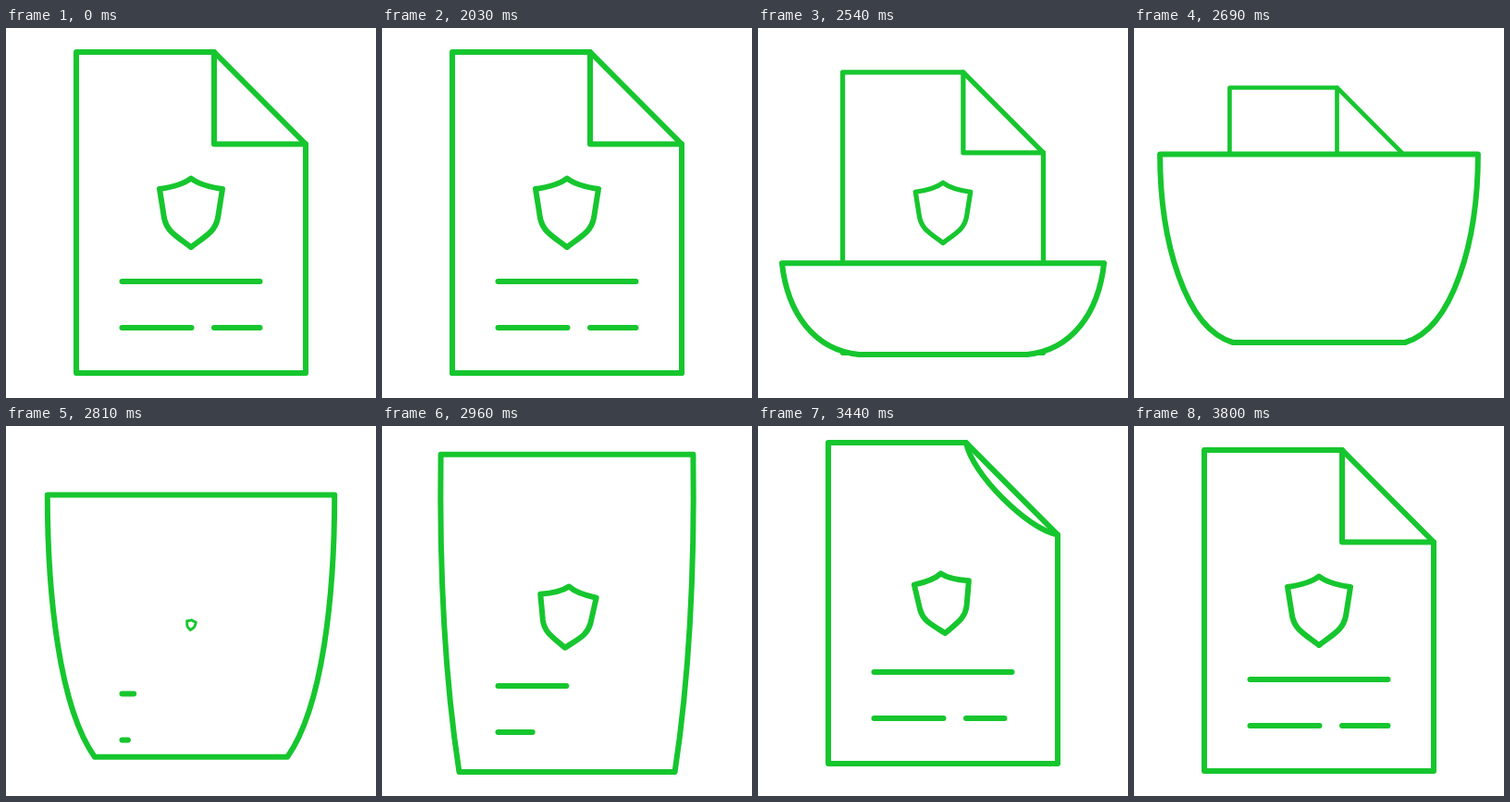
Recreate the animation shown at these times as an HTML page with a canvas. Size 400 by 400 pixels, loop 3830 ms.

```html
<!DOCTYPE html>
<html lang="en">
<head>
<meta charset="utf-8">
<title>Secured document</title>
<style>
  html, body { margin: 0; width: 100%; height: 100%; overflow: hidden; background: #fff; }
  canvas { display: block; width: 400px; height: 400px; }
</style>
</head>
<body>
<canvas id="stage" width="400" height="400"></canvas>
<script>
const ctx = document.getElementById('stage').getContext('2d');
const LOOP = 3830, FLIP = 2030, FLAT = 3200, CUT = 99.5;
const SHIELD = new Path2D('M0-37Q-10-29-34-25.5L-29 6C-26 20-18 24 0 37.5C18 24 26 20 29 6L34-25.5Q10-29 0-37Z');

// Turning sheet: time, edge y, edge half-width, fold y, fold half-width,
// then half-width and height fraction of both side handles
const SHEET = [
  [2030, 373, 124, 373, 124, 124, .4, 124, .8],
  [2150, 381, 133, 372, 119, 131, .5, 124, .9],
  [2270, 375, 147, 371, 106, 138, .65, 124, 1],
  [2390, 345, 159, 368, 95, 145, .74, 125, 1],
  [2540, 255, 174, 353, 91, 168, .55, 139, .95],
  [2600, 205, 177, 346, 91, 173, .5, 143, .94],
  [2690, 137, 172, 340, 93, 172, .46, 145, .926],
  [2820, 71, 154, 359, 105, 154, .38, 142, .8],
  [2960, 31, 136.5, 374, 116.5, 138, .32, 134, .67],
  [3080, 19, 129, 370, 122, 130, .33, 128, .67],
  [FLAT, 12, 124, 359, 124, 124, .33, 124, .67]
];
const RISE = [[FLAT, -14], [3260, -15], [3440, -8], [3620, -2], [3800, 0]];
const INK_Y = [[2780, 16], [2960, 7], [3080, -5], [FLAT, -14]];
const CORNER = [[FLAT, -1], [3440, .2], [3620, 1]];
const BADGE = [[2760, 0, 9], [2960, .89, 3.7], [3200, .88, 0], [3440, .87, -4.2], [3740, 1, 0]];

// Smooth interpolation through rows of [time, ...values]
function track(rows, t) {
  const last = rows.length - 1;
  if (t <= rows[0][0]) return rows[0].slice(1);
  if (t >= rows[last][0]) return rows[last].slice(1);
  let i = 0;
  while (rows[i + 1][0] <= t) i++;
  const slope = (k, c) => {
    if (k === 0 || k === last) return 0;
    const [a, b, d] = [rows[k - 1], rows[k], rows[k + 1]];
    return (b[c] - a[c]) * (d[c] - b[c]) <= 0 ? 0 : (d[c] - a[c]) / (d[0] - a[0]);
  };
  const a = rows[i], b = rows[i + 1], span = b[0] - a[0];
  const u = (t - a[0]) / span, w = u * u * (3 - 2 * u);
  return a.slice(1).map((v, j) => {
    const c = j + 1;
    return v + (b[c] - v) * w +
      span * u * (1 - u) * ((1 - u) * slope(i, c) - u * slope(i + 1, c));
  });
}

const clamp = v => Math.min(1, Math.max(0, v));
const ramp = (t, from, to) => clamp((t - from) / (to - from));

function line(x, y, length) {
  if (length <= 0) return;
  ctx.beginPath();
  ctx.moveTo(x, y);
  ctx.lineTo(x + length, y);
  ctx.stroke();
}

function ink(dy, size, angle, long, short) {
  if (size > 0) {
    ctx.save();
    ctx.translate(200, 199.5 + dy);
    ctx.rotate(angle * Math.PI / 180);
    ctx.scale(size, size);
    ctx.lineWidth = 6 / Math.max(size, .3);
    ctx.stroke(SHIELD);
    ctx.restore();
  }
  line(125.5, 274 + dy, 149 * long);
  line(125.5, 324 + dy, 75 * long);
  line(225, 324 + dy, 49.5 * short);
}

// q runs from -1 (square corner) through 0 (on the crease) to 1 (folded down)
function page(dy, q) {
  const top = 26 + dy, x = 225, right = 324, low = top + CUT;
  const mx = 274.5 - 49.5 * q, my = top + CUT / 2 * (1 + q);
  const bend = 25 * (1 - Math.abs(q));
  const hx = 17 * clamp(1 - 4 * q), hy = 17 * clamp(1 + 4 * q);
  const flap = () => {
    ctx.bezierCurveTo(x + hx, top + hy, mx - bend, my - bend, mx, my);
    ctx.bezierCurveTo(mx + bend, my + bend, right - hy, low - hx, right, low);
  };
  ctx.beginPath();
  ctx.moveTo(x, top);
  if (q < 0) flap(); else ctx.lineTo(right, low);
  ctx.lineTo(right, 373 + dy);
  ctx.lineTo(76, 373 + dy);
  ctx.lineTo(76, top);
  ctx.closePath();
  ctx.fill();
  ctx.stroke();
  if (q >= 0) {
    ctx.beginPath();
    ctx.moveTo(x, top);
    flap();
    ctx.stroke();
  }
}

function sheet(t) {
  const [y, w, foldY, foldW, aw, ay, bw, by] = track(SHEET, t);
  const at = f => y + (foldY - y) * f;
  ctx.beginPath();
  ctx.moveTo(200 - w, y);
  ctx.bezierCurveTo(200 - aw, at(ay), 200 - bw, at(by), 200 - foldW, foldY);
  ctx.lineTo(200 + foldW, foldY);
  ctx.bezierCurveTo(200 + bw, at(by), 200 + aw, at(ay), 200 + w, y);
  ctx.closePath();
  ctx.fill();
  ctx.stroke();
}

function draw(t) {
  ctx.fillStyle = '#fff';
  ctx.strokeStyle = '#16c62e';
  ctx.lineWidth = 6;
  ctx.lineCap = ctx.lineJoin = 'round';
  ctx.fillRect(0, 0, 400, 400);

  if (t < 2880) {
    const s = 1 - 6e-7 * Math.max(0, t - 2084) ** 2;
    ctx.save();
    ctx.translate(200, 200);
    ctx.scale(s, s);
    ctx.translate(-200, -200);
    page(0, 1);
    ink(0, 1, 0, 1, 1);
    ctx.restore();
  }
  if (t <= FLIP) return;

  const [rise] = track(RISE, t);
  if (t < FLAT) sheet(t);
  else page(rise, track(CORNER, t)[0]);

  const dy = t < FLAT ? track(INK_Y, t)[0] : rise;
  const [size, angle] = track(BADGE, t);
  ink(dy, size, angle, ramp(t, 2780, 3145), ramp(t, 3190, 3490));
}

const start = performance.now();
function tick() {
  draw((performance.now() - start) % LOOP);
  requestAnimationFrame(tick);
}
tick();
</script>
</body>
</html>
```
